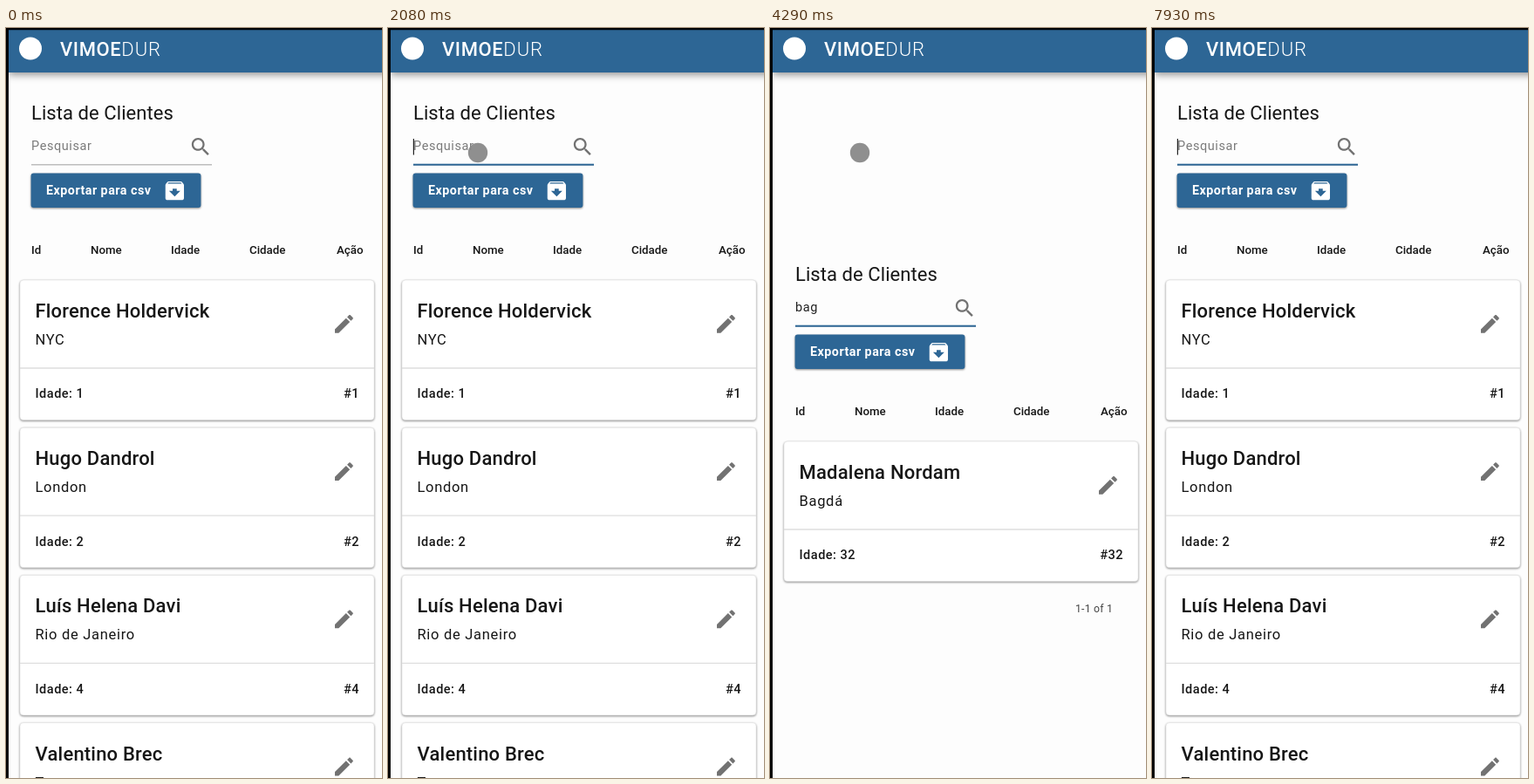
Write an HTML page that moves like this. It is 431 by 860 pixels and loops after 8000 ms.

```html
<!DOCTYPE html>
<html lang="pt">
<head>
<meta charset="utf-8">
<title>Lista de Clientes</title>
<style>
html, body { margin: 0; width: 100%; height: 100%; overflow: hidden; background: #fdfdfd; }
svg { display: block; font-family: Roboto, sans-serif; fill: #161616; }
.brand { font-size: 22px; font-weight: 500; fill: #fff; letter-spacing: .6px; }
.brand tspan { font-weight: 300; letter-spacing: .9px; }
.title { font-size: 22px; letter-spacing: .07px; }
.input { font-size: 14.5px; letter-spacing: .58px; }
.button { font-size: 14.3px; font-weight: 700; fill: #fff; letter-spacing: .48px; }
.head { font-size: 13.3px; font-weight: 500; }
.name { font-size: 22px; font-weight: 500; letter-spacing: .2px; }
.city { font-size: 16.5px; letter-spacing: .7px; }
.info { font-size: 14.5px; font-weight: 500; letter-spacing: .5px; }
.pages { font-size: 12.2px; letter-spacing: .25px; fill: #444; }
.end { text-anchor: end; }
.icon { fill: #727272; }
.raised { filter: drop-shadow(0 1px 1.2px rgba(0,0,0,.45)); }
.bar { filter: drop-shadow(0 3px 4px rgba(0,0,0,.4)); }
</style>
</head>
<body>
<svg width="431" height="860" viewBox="0 0 431 860">
  <defs>
    <path id="pencil" class="icon" d="M3 17.25V21h3.75L17.81 9.94l-3.75-3.75L3 17.25zM20.71 7.04c.39-.39.39-1.02 0-1.41l-2.34-2.34c-.39-.39-1.02-.39-1.41 0l-1.83 1.83 3.75 3.75 1.83-1.83z"/>
  </defs>
  <rect width="431" height="860" fill="#fdfdfd"/>
  <g id="page">
    <text class="title" x="29" y="105">Lista de Clientes</text>
    <text id="field" class="input" x="29" y="140"></text>
    <path class="icon" transform="translate(209.4 122.6) scale(1.14)" d="M15.5 14h-.79l-.28-.27C15.41 12.59 16 11.11 16 9.5 16 5.91 13.09 3 9.5 3S3 5.91 3 9.5 5.91 16 9.5 16c1.61 0 3.09-.59 4.23-1.57l.27.28v.79l5 4.99L20.49 19l-4.99-5zm-6 0C7.01 14 5 11.99 5 9.5S7.01 5 9.5 5 14 7.01 14 9.5 11.99 14 9.5 14z"/>
    <rect x="29" y="156" width="207" height="1.5" fill="#bdbdbd"/>
    <rect id="focus" y="155.7" height="2" fill="#2d6695"/>
    <rect id="caret" y="127" width="1.2" height="18.5" fill="#222"/>
    <rect class="raised" x="28.6" y="166.4" width="194.8" height="39.6" rx="3" fill="#2d6695"/>
    <text class="button" x="46" y="191">Exportar para csv</text>
    <path fill="#fff" transform="translate(179.2 172.5) scale(1.18)" d="M20.54 5.23l-1.39-1.68C18.88 3.21 18.47 3 18 3H6c-.47 0-.88.21-1.16.55L3.46 5.23C3.17 5.57 3 6.02 3 6.5V19c0 1.1.9 2 2 2h14c1.1 0 2-.9 2-2V6.5c0-.48-.17-.93-.46-1.27zM12 17.5L6.5 12H10v-2h4v2h3.5L12 17.5zM5.12 5l.81-1h12l.94 1H5.12z"/>
    <g class="head">
      <text x="29" y="259">Id</text><text x="97" y="259">Nome</text><text x="189" y="259">Idade</text>
      <text x="279" y="259">Cidade</text><text x="379" y="259">Ação</text>
    </g>
    <g id="all"></g>
    <g id="found"><text class="pages" x="350" y="485">1-1 of 1</text></g>
  </g>
  <rect class="bar" x="3" y="2" width="440" height="49" fill="#2d6695"/>
  <circle cx="28" cy="23.5" r="13" fill="#fff"/>
  <text class="brand" x="62" y="32">VIMOE<tspan>DUR</tspan></text>
  <path d="M0 0H431V2.3H3V860H0z" fill="#000"/>
  <circle id="dot" r="11.2" fill="#868686" fill-opacity=".93"/>
</svg>
<script>
const $ = id => document.getElementById(id);
const LOOP = 8000, STEP = 130;

const card = (name, city, age, row) => `
  <g transform="translate(0 ${row * 169.2})">
    <rect class="raised" x="16" y="289" width="406" height="160.6" rx="4" fill="#fff" stroke="#ddd" stroke-width=".6"/>
    <path d="M16 390H422" stroke="#dedede" stroke-width="1.3"/>
    <text class="name" x="33.5" y="332">${name}</text>
    <text class="city" x="33.5" y="363">${city}</text>
    <text class="info" x="33.5" y="424.4">Idade: ${age}</text>
    <text class="info end" x="405" y="424.4">#${age}</text>
    <use href="#pencil" transform="translate(373.5 325.5) scale(1.16)"/>
  </g>`;

$('all').innerHTML = [
  ['Florence Holdervick', 'NYC', 1],
  ['Hugo Dandrol', 'London', 2],
  ['Luís Helena Davi', 'Rio de Janeiro', 4],
  ['Valentino Brec', 'Toronto', 5]
].map((c, i) => card(...c, i)).join('');
$('found').innerHTML += card('Madalena Nordam', 'Bagdá', 32, 0);

// [start, text] of the search field
const typing = [[0, ''], [3510, 'b'], [3640, 'ba'], [3770, 'bag'], [5200, 'ba'], [5330, 'b'], [5460, '']];
const caretOn = [[1820, 2340], [2860, 3380], [3510, 4290], [4810, 5590], [5980, 6370], [6890, 7410], [7930, LOOP]];
// [time, x, y] of the pointer
const pointer = [[0, 190, -14], [130, 182, 40], [1040, 102, 139], [1820, 102, 139], [1950, 103, 143],
  [5200, 103, 143], [5590, 180, -14], [LOOP, 180, -14]];

const show = (id, on) => $(id).setAttribute('visibility', on ? 'visible' : 'hidden');
const put = (id, attrs) => Object.entries(attrs).forEach(([k, v]) => $(id).setAttribute(k, v));
const clamp = v => Math.max(0, Math.min(1, v));
const ease = p => p * p * (3 - 2 * p);

function draw(now) {
  const t = Math.floor(now % LOOP / STEP) * STEP;
  const filtered = t >= 4160 && t < 5980;
  put('page', { transform: `translate(0 ${filtered ? 185 : 0})` });
  show('all', !filtered);
  show('found', filtered);

  const text = typing.filter(k => k[0] <= t).pop()[1];
  $('field').textContent = text || 'Pesquisar';
  put('field', { fill: text ? '#222' : '#7b7b7b' });
  put('caret', { x: 28.8 + (text ? $('field').getComputedTextLength() : 0) });
  show('caret', caretOn.some(([a, b]) => t >= a && t < b));

  const width = 207 * ease(clamp((t - 1690) / 390));
  put('focus', { x: 132.5 - width / 2, width });

  const i = pointer.findIndex(k => k[0] > t);
  const [t0, x0, y0] = pointer[i - 1], [t1, x1, y1] = pointer[i];
  const p = ease((t - t0) / (t1 - t0));
  put('dot', { cx: x0 + (x1 - x0) * p, cy: y0 + (y1 - y0) * p });
}

function frame() {
  draw(performance.now());
  requestAnimationFrame(frame);
}
frame();
</script>
</body>
</html>
```
